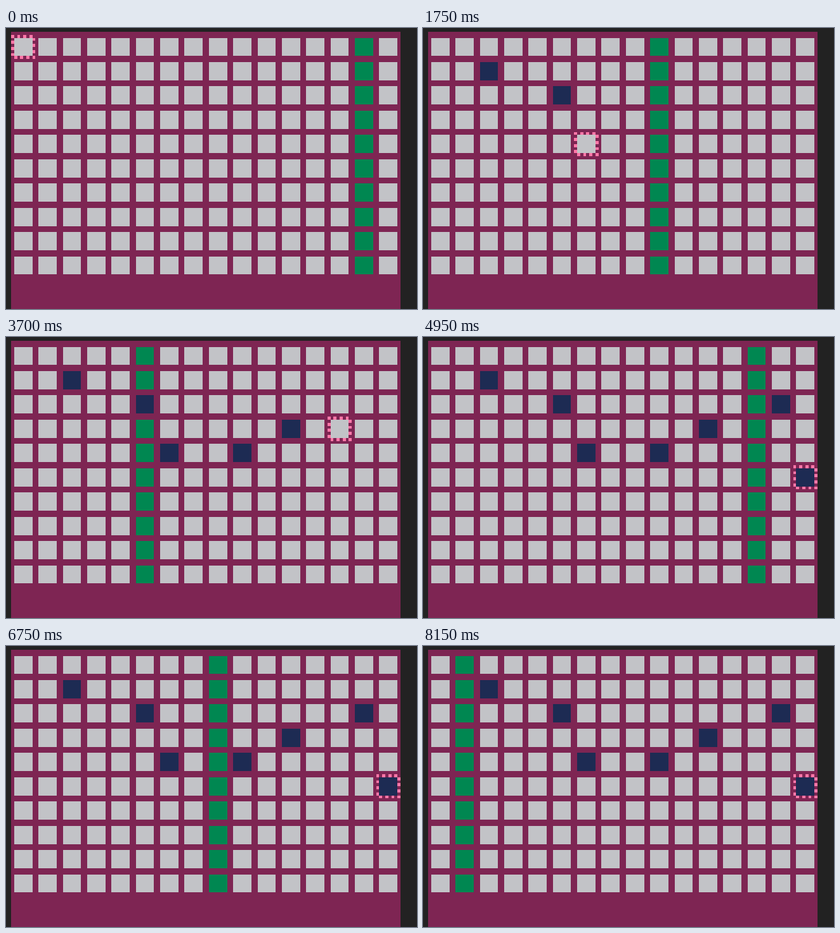
An HTML page with a canvas that plays this animation: 648 by 445 pixels, repeating every 8.25 s.

```html
<!DOCTYPE html>
<html lang="en">
<head>
<meta charset="utf-8">
<title>Step grid</title>
<style>
  html, body { margin: 0; width: 100%; height: 100%; overflow: hidden; background: #222; }
  canvas { display: block; }
</style>
</head>
<body>
<canvas id="stage" width="648" height="445"></canvas>
<script>
const ctx = document.getElementById('stage').getContext('2d');
const LOOP = 8250, TICK = 50;
const COLS = 16, ROWS = 10;
const PITCH_X = 38.375, PITCH_Y = 38.44;
const COLOR = {
  back: '#222222', panel: '#7e2553', cell: '#c2c3c7',
  head: '#008751', note: '#1d2b53', cursor: '#ff77a8'
};

// Key presses (R, U, D move the cursor, * sets a cell) and their ticks.
const KEYS = 'RRD*RRRD*RDD*RRR*RRU*RRRU*RDDD*';
const KEY_TICKS = [
  10, 14, 16, 19, 21, 23,
  25, 27, 29, 31, 33, 35, 37, 39, 41, 43,
  49, 52, 56, 59, 62, 65, 68,
  75, 77, 79, 82, 84, 86, 89, 91
];

// Fill a rectangle given by its edges, snapped to whole pixels.
function box(color, x0, y0, x1, y1) {
  const x = Math.round(x0), y = Math.round(y0);
  ctx.fillStyle = color;
  ctx.fillRect(x, y, Math.round(x1) - x, Math.round(y1) - y);
}

function headColumn(time) {
  const step = Math.floor((time - 4942) / 160.1);
  return (((13 + step) % COLS) + COLS) % COLS;
}

function editorState(tick) {
  const notes = new Set();
  let x = 0, y = 0;
  for (let i = 0; i < KEYS.length && KEY_TICKS[i] <= tick; i++) {
    const key = KEYS[i];
    if (key === 'R') x++;
    else if (key === 'D') y++;
    else if (key === 'U') y--;
    else notes.add(y * COLS + x);
  }
  return { x, y, notes };
}

function drawCursor(col, row) {
  const w = 4.8, size = 8 * w;
  const x = 8 + col * PITCH_X, y = 10.8 + row * PITCH_Y;
  const right = x + size - 0.05, bottom = y + size;
  for (let i = 0; i < 4; i++) {
    const a = i * 2 * w, b = a + w, c = b + w;
    box(COLOR.cursor, x + a, y, x + b, y + w);
    box(COLOR.cursor, x, y + a, x + w, y + b);
    box(COLOR.cursor, x + b, bottom - w, x + c, bottom);
    box(COLOR.cursor, right - w, y + b, right, y + c);
  }
}

function draw(tick) {
  const head = headColumn(tick * TICK);
  const { x, y, notes } = editorState(tick);
  box(COLOR.back, 0, 0, 648, 445);
  box(COLOR.panel, 8, 6, 622, 445);
  for (let row = 0; row < ROWS; row++) {
    for (let col = 0; col < COLS; col++) {
      const left = 12.8 + col * PITCH_X, top = 15.55 + row * PITCH_Y;
      const color = notes.has(row * COLS + col) ? COLOR.note
        : col === head ? COLOR.head : COLOR.cell;
      box(color, left, top, left + 28.8, top + 28.9);
    }
  }
  drawCursor(x, y);
}

const start = performance.now();
function frame() {
  const time = (performance.now() - start) % LOOP;
  draw(Math.floor(time / TICK));
  requestAnimationFrame(frame);
}
frame();
</script>
</body>
</html>
```
